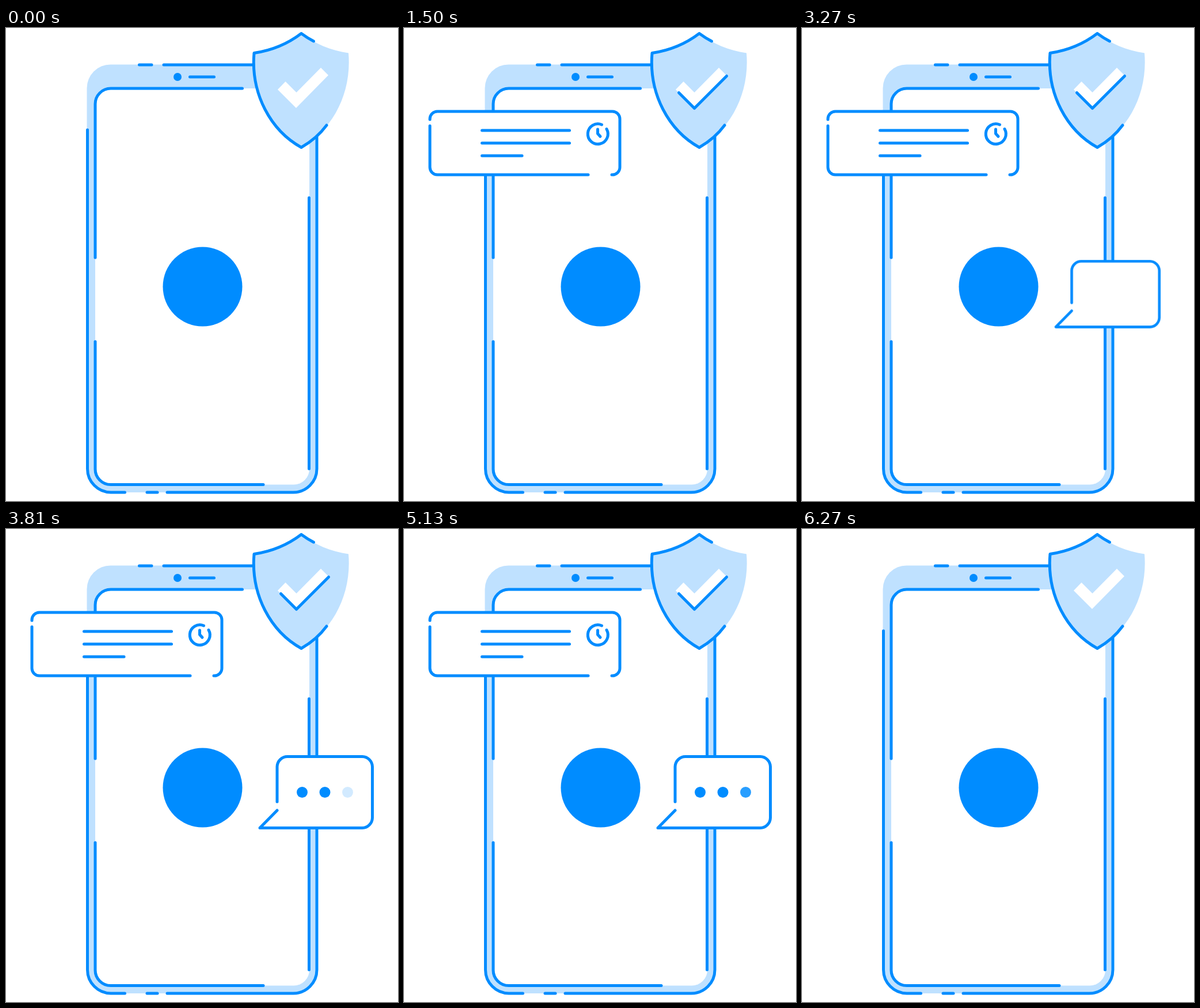
These frames come from a looping animation (681 px wide and 822 px high, 6360 ms). An HTML page:

```html
<!DOCTYPE html>
<html lang="en">
<head>
<meta charset="utf-8">
<title>Secure phone messages</title>
<style>
  html, body { margin: 0; width: 100%; height: 100%; overflow: hidden; background: #fff; }
  svg { display: block; width: 681px; height: 822px; }
  .line { fill: none; stroke: #008cff; stroke-width: 5; stroke-linecap: round; stroke-linejoin: round; }
  .blue { fill: #008cff; }
  .pale { fill: #bfe1ff; }
  .white { fill: #fff; }

  .shield, .tick, .card, .row, .bubble, .dot {
    animation: 6360ms ease-in-out var(--wait, 0ms) infinite backwards;
  }
  .shield { animation-name: bob; }
  .tick { animation-name: tick; }
  .row { animation-name: row; }
  .tick, .row { stroke-dasharray: 1 2; }
  .card { animation-name: card; transform-origin: 375.5px 255px; }
  .bubble { animation-name: bubble; transform-origin: 440px 520px; }
  .dot { animation-name: blink; animation-timing-function: linear; }

  @keyframes bob {
    0%, 20.75%, 100% { transform: translateY(0); }
    10.5% { transform: translateY(7px); }
  }
  @keyframes tick {
    0%, .94% { stroke-dashoffset: 1.03; }
    10.38%, 89.47% { stroke-dashoffset: 0; }
    97.5%, 100% { stroke-dashoffset: -1.03; }
  }
  @keyframes row {
    0%, 10.22% { stroke-dashoffset: 1.01; }
    15.72%, 88.05% { stroke-dashoffset: 0; }
    91.98%, 100% { stroke-dashoffset: -1.01; }
  }
  @keyframes card {
    0%, 6.29%, 98.43%, 100% { transform: scale(0); }
    15.72%, 91.2% { transform: scale(1); }
  }
  @keyframes bubble {
    0%, 43.87%, 92.6%, 100% { transform: scale(0); }
    53.3%, 83.18% { transform: scale(1); }
  }
  @keyframes blink {
    0%, 53.77%, 65.57%, 72.64%, 95%, 100% { opacity: 0; }
    56.6%, 62.74%, 75.47%, 94% { opacity: 1; }
  }
</style>
</head>
<body>
<svg viewBox="0 0 681 822">
  <!-- phone -->
  <rect class="pale" x="140.500" y="63.500" width="400" height="743.500" rx="41"/>
  <rect class="white" x="155" y="105" width="372" height="688.500" rx="27"/>
  <path class="line" d="M141.500 177V766A41 41 0 0 0 182 807H206.500M245 807H263M280 807H499A41 41 0 0 0 540 766V180
    M231.500 64H253M274 64H432
    M410.500 105H182A27 27 0 0 0 155 132V399M155 545V766A27 27 0 0 0 182 793.500H447M526.500 295V766
    M319.500 85H361.500"/>
  <circle class="blue" cx="298" cy="85" r="7"/>
  <circle class="blue" cx="341.500" cy="449.500" r="69"/>

  <g class="shield">
    <path class="pale" d="M513 9.500C490 27 462 39 431 43.500C425 115 460 178 513 207.500C566 178 601 115 595 43.500C564 39 536 27 513 9.500Z"/>
    <path class="line" d="M534.500 23Q523 17 513 9.500C490 27 462 39 431 43.500C425 115 460 178 513 207.500Q540 192 557 169"/>
    <path class="white" d="M472 107L485.500 93L504.500 112L547 69L560 82L504 139Z"/>
    <path class="line tick" pathLength="1" d="M477.500 112.500L504.500 139.500L560.500 83.500"/>
  </g>

  <g class="card">
    <rect class="white" x="45" y="145" width="330.500" height="110" rx="13"/>
    <path class="line" d="M45 159V158A13 13 0 0 1 58 145H362A13 13 0 0 1 375 158V242A13 13 0 0 1 361 255M45 170V242A13 13 0 0 0 58 255H320"/>
    <path class="line" d="M343.500 168A17.500 17.500 0 1 0 352 175.500M336.500 176V183.500L341 188.500"/>
    <path class="line row" pathLength="1" d="M135.500 178H287.500"/>
    <path class="line row" style="--wait:160ms" pathLength="1" d="M135.500 200H287.500"/>
    <path class="line row" style="--wait:320ms" pathLength="1" d="M135.500 222H205"/>
  </g>

  <g class="bubble">
    <path class="white" d="M471 474V413A18 18 0 0 1 489 395.500H619A18 18 0 0 1 636.500 413V502A18 18 0 0 1 619 519.500H441L471 489Z"/>
    <path class="line" d="M471 474V413A18 18 0 0 1 489 395.500H619A18 18 0 0 1 636.500 413V502A18 18 0 0 1 619 519.500H441L471 489"/>
    <circle class="blue dot" cx="514.500" cy="457.500" r="9.500"/>
    <circle class="blue dot" style="--wait:180ms" cx="554" cy="457.500" r="9.500"/>
    <circle class="blue dot" style="--wait:360ms" cx="593.500" cy="457.500" r="9.500"/>
  </g>
</svg>
</body>
</html>
```
